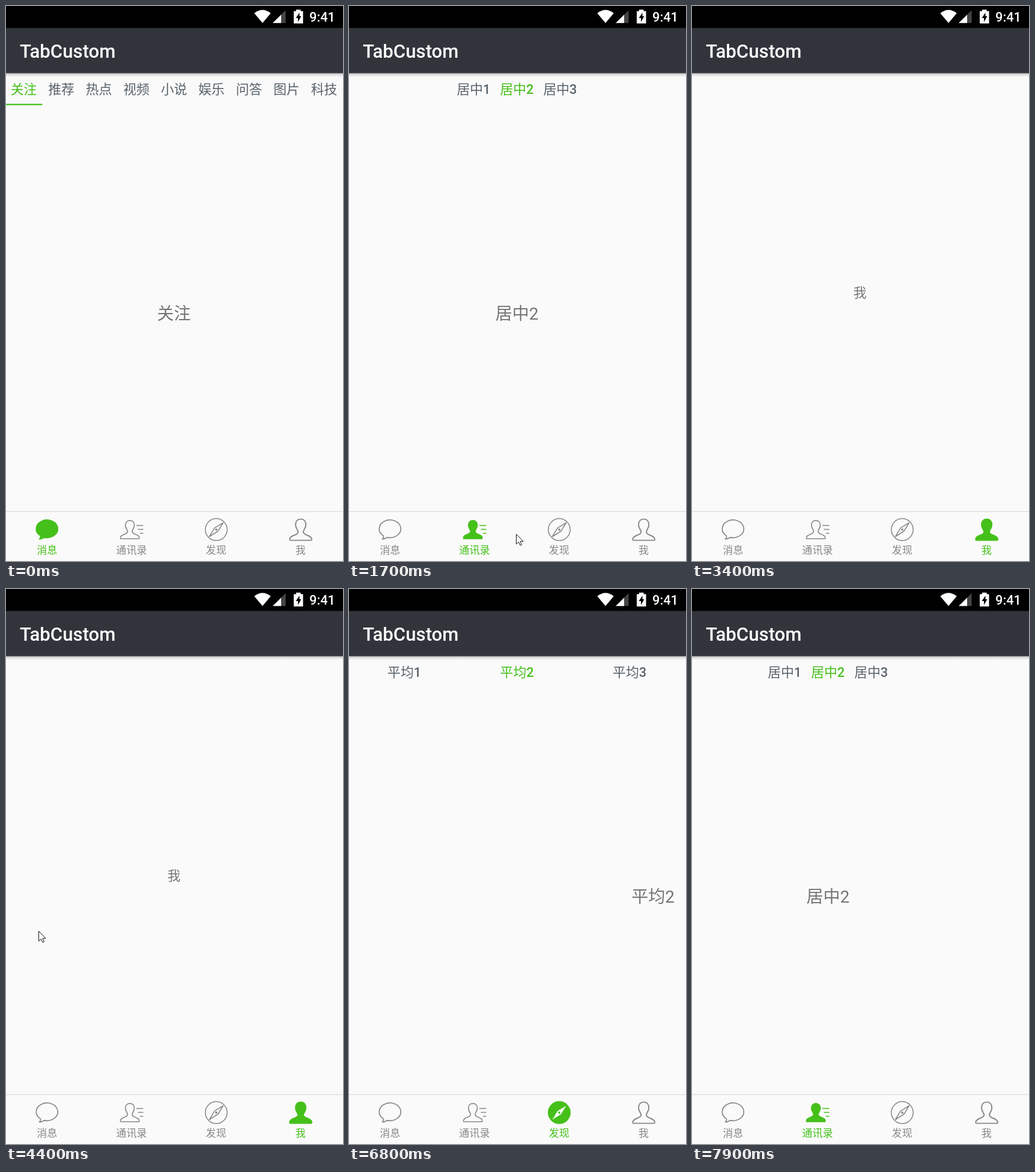
These frames come from a looping animation (561x922 px, 8000 ms). An HTML page:

```html
<!DOCTYPE html>
<html lang="zh-CN">
<head>
<meta charset="utf-8">
<title>TabCustom</title>
<style>
  html, body { margin: 0; width: 100%; height: 100%; overflow: hidden; background: #fafafa; }
  svg { display: block; width: 561px; height: 922px; }
  text { font-family: Roboto, 'Noto Sans CJK SC', 'Noto Sans CJK', sans-serif; text-anchor: middle; }
  .bar { font-weight: 500; fill: #fff; text-anchor: start; }
  .tab { font-size: 21.8px; fill: #59636b; }
  .tab tspan { font-weight: 500; }
  .big { font-size: 28px; fill: #757575; }
  .note { font-size: 21.8px; fill: #757575; }
  .label { font-size: 17.1px; fill: #888; }
  .icon { fill: none; stroke: #888; stroke-width: 1.7; stroke-linejoin: round; }
  .icon path, .icon circle { vector-effect: non-scaling-stroke; }
  .thin { stroke-width: 1.5; }
  .dot { fill: #888; stroke: none; }
  .tab.on, .label.on { fill: #45c01a; }
  .icon.on { fill: #45c01a; stroke: #45c01a; }
  .on .needle { fill: #fff; stroke: none; }
  .on .dot { fill: #45c01a; }
</style>
</head>
<body>
<svg viewBox="0 0 561 922">
  <defs>
    <linearGradient id="shade" x2="0" y2="1">
      <stop stop-opacity=".36"/><stop offset=".4" stop-opacity=".12"/><stop offset="1" stop-opacity="0"/>
    </linearGradient>
    <path id="person" d="M0-15.200C5-15.200 7.400-11.500 7.400-7C7.400-2.500 3.800 .5 3.800 3.200C3.800 7 10 7.600 13.500 10C15.500 11.500 16 13 15.800 14.200Q15.600 15.200 14.500 15.200H-14.500Q-15.600 15.200-15.800 14.200C-16 13-15.500 11.500-13.500 10C-10 7.600-3.800 7-3.800 3.200C-3.800 .5-7.400-2.500-7.400-7C-7.400-11.500-5-15.200 0-15.200Z"/>
  </defs>
  <rect width="561" height="922" fill="#fafafa"/>
  <g id="pages"></g>

  <rect y="111" width="561" height="7" fill="url(#shade)"/>
  <rect width="561" height="111.5" fill="#31343b"/>
  <rect width="561" height="36.5"/>
  <text class="bar" x="23" y="85.8" font-size="31.2">TabCustom</text>
  <text class="bar" x="505" y="26" font-size="21.8">9:41</text>
  <g fill="#fff">
    <path d="M413.300 12Q427 1 440.700 12L427 28.300Z"/>
    <path d="M444 28.300L465.500 7V28.300Z" fill="#454545"/>
    <path d="M444 28.300L458 14.500V28.300Z"/>
    <path d="M479 8.500H483V6H490.500V8.500H494.500V29H479Z"/>
    <path d="M488.500 11L482.500 20H486V26.500L491.500 17H488.500Z" fill="#000"/>
  </g>

  <rect y="839" width="561" height="83" fill="#fafafa"/>
  <rect y="839" width="561" height="1.6" fill="#e1e1e1"/>
  <g class="icon"><path d="M57.500 880.300A18 14.700 0 1 1 64 882.800Q60 885.300 55.500 885.600Q58 883 57.500 880.300Z"/></g>
  <g class="icon">
    <use href="#person" x="206.2" y="869.8"/>
    <path d="M217 863H228.500M219.500 869.500H228.500M223 876H228.500"/>
  </g>
  <g class="icon thin">
    <circle cx="350" cy="869.8" r="18.2"/>
    <path class="needle" d="M361.500 858.500L352.800 872.500L338.500 881.500L347.200 867.200Z"/>
    <circle class="dot" cx="350" cy="869.8" r="1.9"/>
  </g>
  <g class="icon"><use href="#person" transform="translate(490.600 870) scale(1.16)"/></g>
  <g id="labels"></g>
  <path id="cursor" d="M.5 .5V17L4.300 13.300L7 19L9.500 18L7 12.300H12Z" fill="#fff" stroke="#111"/>
</svg>
<script>
const WIDTH = 561, LOOP = 8000, STEP = 100;
const $ = id => document.getElementById(id);
const all = selector => [...document.querySelectorAll(selector)];

const text = (cls, x, y, s) =>
  `<text class="${cls}" x="${x}" y="${y}">${s.replace(/\d/, '<tspan>$&</tspan>')}</text>`;
const tabs = (names, middle, pitch, active) => names.map((s, i) =>
  text(i === active ? 'tab on' : 'tab', middle + (i - (names.length - 1) / 2) * pitch, 146.4, s)).join('');
const big = (s, x = 279.6) => text('big', x, 520.6, s);
const numbered = s => [1, 2, 3].map(n => s + n);

const topics = ['关注', '推荐', '热点', '视频', '小说', '娱乐', '问答', '图片', '科技'];
$('pages').innerHTML = [
  tabs(topics, 279.6, 62.5, 0) + '<rect y="162.5" width="60.5" height="2.3" fill="#45c01a"/>' + big('关注'),
  tabs(numbered('居中'), 279.5, 72, 1) + big('居中2'),
  tabs(numbered('平均'), 279.6, 187.5, 1) + `<g id="inner">${big('平均2')}${big('平均1', 279.6 - WIDTH)}</g>`,
  text('note', 279.6, 484.3, '我')
].map(s => `<g class="page">${s}</g>`).join('');
$('labels').innerHTML = ['消息', '通讯录', '发现', '我']
  .map((s, i) => text('label', 68.3 + i * 140.7, 909.7, s)).join('');

const pages = all('.page'), icons = all('.icon'), labels = all('.label');
const evenTabs = [...pages[2].querySelectorAll('.tab')];

// A tap fills the icon first and opens its page when released
const taps = [
  { press: 1100, release: 1300, page: 1 },
  { press: 2100, release: 2300, page: 2 },
  { press: 3200, release: 3400, page: 3 }
];
// A swipe brings in the page on the left; its tab lights up on release
const swipes = [
  { start: 4500, duration: 900, release: 4900, page: 2 },
  { start: 7500, duration: 610, release: 7800, page: 1 }
];
const innerSwipe = { start: 6500, duration: 900, release: 6900 };

// The pointer follows a quadratic curve and hides while the screen is touched
const pointerMoves = [
  { start: 200, duration: 500, hide: 1100, curve: [[526, 603], [280, 840], [199, 887]] },
  { start: 1500, duration: 400, hide: 2100, curve: [[199, 887], [290, 880], [333, 860]] },
  { start: 2600, duration: 400, hide: 3200, curve: [[336, 866], [458, 916], [481, 867]] },
  { start: 3600, duration: 800, hide: 4600, curve: [[481, 885], [150, 780], [54, 568]] },
  { start: 5500, duration: 700, hide: 6600, curve: [[407, 588], [330, 997], [25, 602]] }
];

const progress = (t, { start, duration }) => Math.min(Math.max((t - start) / duration, 0), 1);
const remaining = (t, swipe) => WIDTH * (1 - progress(t, swipe) ** 1.92) ** 4;
const bezier = (u, [a, b, c]) =>
  [0, 1].map(k => (1 - u) ** 2 * a[k] + 2 * u * (1 - u) * b[k] + u * u * c[k]);
const move = (el, x, y = 0) => el.setAttribute('transform', `translate(${x} ${y})`);
const show = (el, visible) => { el.style.display = visible ? '' : 'none'; };
const light = (list, test) => list.forEach((el, i) => el.classList.toggle('on', test(i)));

function render(t) {
  const tap = taps.findLast(({ release }) => t >= release);
  const swipe = swipes.findLast(({ start }) => t > start);
  const page = (swipe || tap || { page: 0 }).page;
  const shift = swipe ? -remaining(t, swipe) : 0;
  pages.forEach((el, i) => {
    show(el, i === page || (shift && i === page + 1));
    move(el, shift + (i - page) * WIDTH);
  });

  move($('inner'), WIDTH - remaining(t, innerSwipe));
  light(evenTabs, i => i === (t < innerSwipe.release ? 1 : 0));

  const tab = swipe && t < swipe.release ? page + 1 : page;
  const pressed = taps.find(({ press, release }) => t >= press && t < release);
  light(icons, i => i === tab || i === pressed?.page);
  light(labels, i => i === tab);

  const pointer = pointerMoves.find(({ start, hide }) => t >= start && t < hide);
  show($('cursor'), pointer);
  if (pointer) move($('cursor'), ...bezier(progress(t, pointer), pointer.curve).map(Math.round));
}

const begin = performance.now();
function tick() {
  const t = (performance.now() - begin) % LOOP;
  render(Math.floor(t / STEP) * STEP);
  requestAnimationFrame(tick);
}
tick();
</script>
</body>
</html>
```
